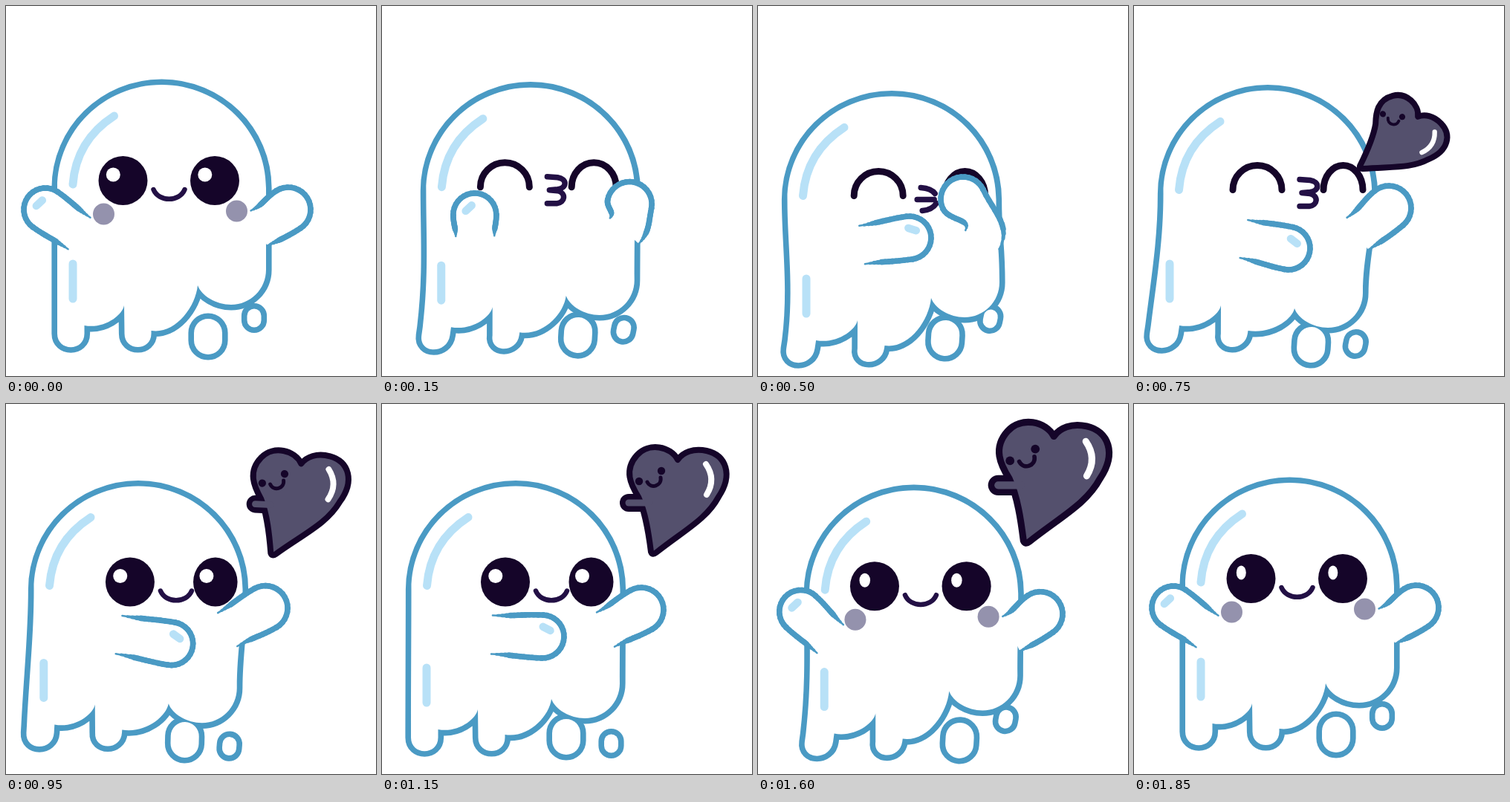
Animation of 498x498 px, one loop 1.9 s. Source, as an HTML page with a canvas:

```html
<!DOCTYPE html>
<html lang="en">
<head>
<meta charset="utf-8">
<title>Ghost blowing a kiss</title>
<style>
  html, body { margin: 0; width: 100%; height: 100%; overflow: hidden; background: #fff; }
  canvas { display: block; width: 498px; height: 498px; }
</style>
</head>
<body>
<canvas id="stage" width="498" height="498"></canvas>
<script>
const LOOP = 1900, STEP = 50;
const LINE = '#4a9ac4', SHINE = '#b8e1f7', DARK = '#150529', LIPS = '#231045',
      BLUSH = '#9492ad', HEART = '#54506d';
const ctx = document.getElementById('stage').getContext('2d');

// head: top of the dome; turn: 0 facing us, 1 turned right; hem: shift x, left y, right y;
// lean: slant of the feet; drops: fall of the large and the small drop; left, right: hands.
const poses = [
  { time: [0],    head: [209.5, 106], turn: [0],   hem: [0, 0, 0],     lean: [0],  drops: [0, 0],   left: [53, 274],  right: [380, 274] },
  { time: [300],  head: [190, 114],   turn: [.87], hem: [-20, 6, 25],  lean: [10], drops: [-3, 26], left: [190, 290], right: [290, 260] },
  { time: [500],  head: [180, 121.5], turn: [.9],  hem: [-25, 20, 17], lean: [6],  drops: [2, 1],   left: [204, 312], right: [276, 260] },
  { time: [750],  head: [180, 113.5], turn: [1],   hem: [-42, 0, 31],  lean: [6],  drops: [11, 35], left: [208, 326], right: [343, 272] },
  { time: [1150], head: [180, 110.5], turn: [1],   hem: [-30, 8, 21],  lean: [0],  drops: [3, 37],  left: [216, 313], right: [349, 277] },
  { time: [1400], head: [206, 121.5], turn: [.1],  hem: [-5, 21, 18],  lean: [8],  drops: [12, 11], left: [81, 287],  right: [376, 287] }
];
poses.push({ ...poses[0], time: [1850] });

const clamp = u => Math.min(1, Math.max(0, u));
const polar = (x, y, angle, r) => [x + r * Math.cos(angle), y + r * Math.sin(angle)];

// Smooth cyclic interpolation between poses.
function poseAt(t) {
  const n = poses.length;
  let i = n - 1;
  while (poses[i].time[0] > t) i--;
  const near = [i - 1, i, i + 1, i + 2].map(k => poses[(k + n) % n]);
  const [ta, tb, tc, td] = near.map((p, k) => p.time[0] + Math.floor((i - 1 + k) / n) * LOOP);
  const span = tc - tb, u = (t - tb) / span, u2 = u * u, u3 = u2 * u;
  const pose = {};
  for (const name in poses[0]) {
    const [a, b, c, d] = near.map(p => p[name]);
    pose[name] = b.map((p, j) => {
      const m = (c[j] - a[j]) / (tc - ta) * span, k = (d[j] - p) / (td - tb) * span;
      return p + (c[j] - p) * (3 * u2 - 2 * u3) + m * (u3 - 2 * u2 + u) + k * (u3 - u2);
    });
  }
  return pose;
}

const heartShape = new Path2D('M1-50C-8-68-38-74-54-56C-72-36-62-16-52 0C-42 22-38 50-35 74' +
  'Q-33 79-28 75C10 45 40 30 56 0C76-30 66-56 40-62C22-66 8-60 1-50Z');
const heartSmile = new Path2D('M-40-20C-35-10-20-15-22-26');
const heartShine = new Path2D('M39-44Q53-24 40-3');
const headShine = new Path2D('M-64 42Q-115 75-119.5 134');
const smile = new Path2D('M-21 0C-14 17 14 17 21 0');
const kiss = new Path2D('M-11-18L3-17C16-15 16-3 3-1L-8 0L3 1C15 4 13 17 2 18L-11 18');
const pucker = new Path2D('M-11-15Q3-14 8-7M-16 1L7 1M-9 16Q4 15 10 6');

function line(path, color, width) {
  ctx.strokeStyle = color;
  ctx.lineWidth = width;
  ctx.stroke(path);
}

function disc(x, y, rx, ry, color) {
  ctx.fillStyle = color;
  ctx.beginPath();
  ctx.ellipse(x, y, rx, ry, 0, 0, 7);
  ctx.fill();
}

function segment(x1, y1, x2, y2, color, width) {
  const p = new Path2D();
  p.moveTo(x1, y1);
  p.lineTo(x2, y2);
  line(p, color, width);
}

function at(x, y, draw) {
  ctx.save();
  ctx.translate(x, y);
  draw();
  ctx.restore();
}

function bodyPath({ head: [tx, ty], hem: [dx, dyLeft, dyRight], lean: [lean] }) {
  const p = new Path2D(), k = .5523, w = 140.5, h = 139;
  const lx = tx - w, rx = tx + w, sy = ty + h;
  const foot = (x1, x2, y, depth) => {
    const tip = depth + (x2 - x1) * 2 / 3, slant = -lean / 40;
    p.lineTo(x1 + depth * slant, y + depth);
    p.bezierCurveTo(x1 + tip * slant, y + tip, x2 + tip * slant, y + tip, x2 + depth * slant, y + depth);
    p.lineTo(x2, y);
  };
  const scallop = (x1, y1, x2, y2) =>
    p.bezierCurveTo((x1 + x2) / 2, y1 + 5, x2 - (x2 - x1) * .05, (y1 + y2) / 2, x2, y2);

  const footX = 69 + dx - lean * .7, footY = 430 + dyLeft;
  p.moveTo(rx, sy);
  p.bezierCurveTo(rx, sy - h * k, tx + w * k, ty, tx, ty);
  p.bezierCurveTo(tx - w * k, ty, lx, sy - h * k, lx, sy);
  p.bezierCurveTo(lx, sy + 60, footX + lean * 1.5, footY - 70, footX, footY);
  foot(footX, 105.5 + dx - lean * .4, footY, 11);
  scallop(105.5 + dx - lean * .4, footY, 159 + dx, 403 + dyLeft);
  foot(159.5 + dx, 195.5 + dx, 437 + dyLeft, 4);

  const cx = 258 + dx, cy = 376 + dyRight, hx = 350 + dx, hy = 355 + dyRight;
  scallop(195.5 + dx, 437 + dyLeft, cx, cy);
  p.bezierCurveTo(cx + 5, cy + 14, hx - 67, hy + 47, hx - 47, hy + 47);
  p.bezierCurveTo(hx - 21, hy + 47, hx, hy + 26, hx, hy);
  p.bezierCurveTo(hx, hy - 50, rx, sy + 50, rx, sy);
  p.closePath();
  return p;
}

function dropPath(x, y, tilt, rx, ry) {
  const shape = new Path2D(), p = new Path2D();
  shape.roundRect(-rx, -ry, rx * 2, ry * 2, rx);
  p.addPath(shape, new DOMMatrix().translate(x, y).rotate(tilt));
  return p;
}

function curve(a, b, c, d) {
  return Array.from({ length: 13 }, (_, i) => {
    const u = i / 12, v = 1 - u;
    return a.map((p, k) => p * v * v * v + 3 * b[k] * u * v * v + 3 * c[k] * u * u * v + d[k] * u * u * u);
  });
}

// A rounded hand joined to both sides of the shoulder; the outline thins out at its ends.
function drawArm([sx, sy], [hx, hy], r, twist) {
  const dir = Math.atan2(hy - sy, hx - sx), root = dir + twist;
  const side = sign => {
    const end = polar(sx, sy, root + sign * Math.PI / 2, 26);
    const rim = polar(hx, hy, dir + sign * Math.PI / 2, r);
    const pull = .42 * Math.hypot(end[0] - rim[0], end[1] - rim[1]);
    return curve(end, polar(...end, root, pull), polar(...rim, dir, -pull), rim);
  };
  const round = Array.from({ length: 19 }, (_, i) => polar(hx, hy, dir + (i / 18 - .5) * Math.PI, r));
  const pts = [...side(-1), ...round, ...side(1).reverse()];

  ctx.fillStyle = '#fff';
  ctx.beginPath();
  pts.forEach(p => ctx.lineTo(...p));
  ctx.fill();
  const last = pts.length - 2;
  for (let i = 0; i <= last; i++) {
    const edge = Math.min(i, last - i);
    segment(...pts[i], ...pts[i + 1], LINE, 7.6 * Math.min(1, (edge + 2) / 6));
  }
}

function drawFace(t, { head: [tx, ty], turn: [turn] }) {
  const closed = t >= 100 && t < 950;
  const lx = tx - 52 + 38 * turn, rx = lx + 123.5 - 8 * turn;
  const y = ty + (closed ? 122 : 129);
  const half = 33 - (closed ? 6.5 : 3) * turn;
  const glint = 9.5 - 3 * clamp((t - 1150) / 600);
  for (const [x, w] of [[lx, 33], [rx, half]]) {
    if (closed) {
      const arc = new Path2D();
      arc.ellipse(x, y + 12, w, 33, 0, Math.PI, 2 * Math.PI);
      line(arc, DARK, 9);
    } else {
      disc(x, y, w, 33, DARK);
      disc(x - w * .4, y - 8, glint, 9.5, '#fff');
    }
  }
  if (closed) at(lx + 68, y + 16, () => line(t >= 400 && t < 600 ? pucker : kiss, LIPS, 7.5));
  else at(lx + 62, y + 12, () => line(smile, LIPS, 6.5));
  if (t < 100 || t >= 1300) {
    disc(lx - 26, y + 45, 14.5, 14.5, BLUSH);
    disc(rx + 29.5, y + 41, 14.5, 14.5, BLUSH);
  }
}

function drawHeart(t) {
  if (t < 600 || t >= 1800) return;
  const back = (1 - clamp((t - 600) / 500)) ** 3;
  const rise = clamp((t - 1150) / 550) ** 2;
  const pop = 1 - clamp((t - 1700) / 100);
  const size = (1 - .6 * back + .2 * rise) * pop;
  const arm = clamp((t - 800) / 200);
  at(397 - 109 * back, 125 + 165 * back - 37 * rise, () => {
    ctx.rotate(1.7 * back);
    ctx.scale(size, size);
    const reach = -42 - 23 * arm;
    if (arm) segment(-38, 8, reach, 8, DARK, 24);
    ctx.fillStyle = HEART;
    ctx.fill(heartShape);
    line(heartShape, DARK, 8 / Math.min(1, Math.max(.6, size)));
    if (arm) segment(-38, 8, reach, 8, HEART, 9);
    disc(-51, -21, 5.2, 5.2, DARK);
    disc(-21, -35, 5.2, 5.2, DARK);
    line(heartSmile, DARK, 5);
    line(heartShine, '#fff', 8);
  });
}

function draw(t) {
  const pose = poseAt(t);
  const { head: [tx, ty], turn: [turn], hem: [dx, dyLeft], lean: [lean], drops, left, right } = pose;
  ctx.fillStyle = '#fff';
  ctx.fillRect(0, 0, 498, 498);
  ctx.lineCap = ctx.lineJoin = 'round';

  // Strokes first, then fills, so touching shapes merge into one outline.
  const shapes = [
    bodyPath(pose),
    dropPath(272 + dx * .8, 445 + drops[0], lean * .6, 19, 24),
    dropPath(334 + dx * .85, 420 + drops[1], lean * 2, 9.5, 12.5)
  ];
  shapes.forEach(p => line(p, LINE, 15.2));
  ctx.fillStyle = '#fff';
  shapes.forEach(p => ctx.fill(p));

  at(tx, ty, () => line(headShine, SHINE, 11));
  segment(90 + dx, 347 + dyLeft, 90 + dx, 394 + dyLeft, SHINE, 11);
  drawFace(t, pose);
  drawHeart(t);

  const shoulder = [tx - 111 + 79 * turn, ty + 200];
  drawArm(shoulder, left, 29, 0);
  const aim = Math.atan2(left[1] - shoulder[1], left[0] - shoulder[0]);
  const tilt = left[0] > shoulder[0] ? aim + .45 : -.75;
  at(left[0], left[1], () => {
    ctx.rotate(tilt);
    segment(-5.5, -12, 5.5, -12, SHINE, 10.5);
  });

  // The right wrist bends as the hand comes in front of the face.
  const root = [tx + 131 - 10 * turn, ty + 193];
  drawArm(root, right, 30, (50 - right[0] + root[0]) / 80);
}

const start = performance.now();
function tick(now) {
  const t = Math.max(0, now - start) % LOOP;
  draw(Math.floor(t / STEP) * STEP);
  requestAnimationFrame(tick);
}
draw(0);
requestAnimationFrame(tick);
</script>
</body>
</html>
```
